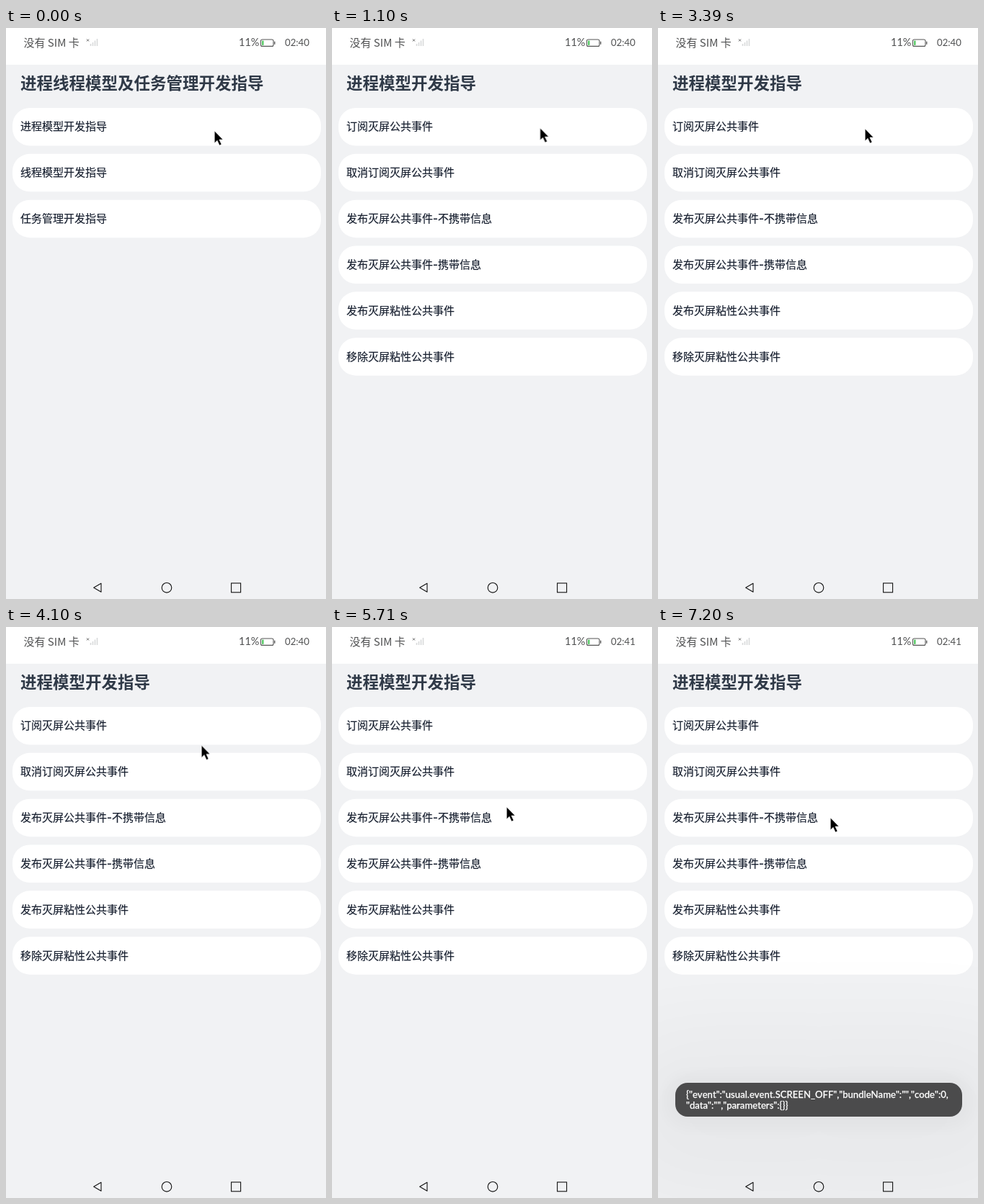
An HTML page that plays this animation: 444 px wide and 793 px high, repeating every 8 s.

```html
<!DOCTYPE html>
<html lang="zh-CN">
<head>
<meta charset="utf-8">
<title>开发指导</title>
<style>
html, body { margin: 0; width: 100%; height: 100%; overflow: hidden; background: #f1f2f4; }
svg, .toast { position: absolute; }
svg { left: 0; top: 0; width: 444px; height: 793px; }
text { font-family: "Noto Sans CJK SC", "Noto Sans CJK", sans-serif; white-space: pre; }
.title { font-size: 22.5px; font-weight: 700; fill: #2f3947; }
.item { font-size: 15px; font-weight: 500; fill: #182030; stroke: #182030; stroke-width: .2px; }
.item tspan { font-family: Inter, sans-serif; }
.status { font-size: 15px; fill: #505152; }
.latin { font-family: Lato, "Noto Sans", sans-serif; font-kerning: none; }
.msg { font-size: 13.1px; font-weight: 500; fill: #fff; stroke: #fff; stroke-width: .25px; }
.toast { box-sizing: border-box; border-radius: 17px; background: #4b4b4c; }
.toast.narrow { box-shadow: 0 6px 36px 18px rgba(0,0,0,.025), 0 8px 130px 70px rgba(0,0,0,.045); }
.toast.wide { box-shadow: 0 2px 24px 16px rgba(0,0,0,.03), 0 20px 140px 100px rgba(0,0,0,.04); }

.home, .guide, .narrow, .wide, .before, .after, .cursor { animation: 8s step-end infinite; }
.home { animation-name: home; }
.guide { animation-name: guide; }
.narrow { animation-name: narrow; }
.wide { animation-name: wide; }
.before { animation-name: before; }
.after { animation-name: after; }
.cursor { animation-name: move; }
@keyframes home { 0% { opacity: 1 } 13.75%, 100% { opacity: 0 } }
@keyframes guide { 0% { opacity: 0 } 13.75%, 100% { opacity: 1 } }
@keyframes narrow { 0% { opacity: 0 } 29.75% { opacity: 1 } 42.375%, 100% { opacity: 0 } }
@keyframes wide { 0% { opacity: 0 } 90%, 100% { opacity: 1 } }
@keyframes before { 0% { opacity: 1 } 71.375%, 100% { opacity: 0 } }
@keyframes after { 0% { opacity: 0 } 71.375%, 100% { opacity: 1 } }
@keyframes move {
  0% { transform: translate(289px, 143px) }
  6.25% { transform: translate(288.5px, 139px) }
  42.375% { transform: translate(287px, 140px) }
  51.25% { transform: translate(271px, 164.5px) }
  54.75% { transform: translate(262px, 183.5px) }
  60.5% { transform: translate(253.5px, 213px) }
  65.625% { transform: translate(247px, 235px) }
  71.375% { transform: translate(242px, 250px) }
  76.75%, 100% { transform: translate(239px, 265px) }
}
</style>
</head>
<body>
<svg viewBox="0 0 444 793">
  <defs><rect id="card" x="9" width="428" height="52.5" rx="24" fill="#fff"/></defs>
  <rect width="444" height="51" fill="#fff"/>

  <text class="status" x="24.5" y="25.5">没有 SIM 卡</text>
  <path d="M112 15.5l3 3m0-3l-3 3" stroke="#555" stroke-width=".9"/>
  <path d="M117.5 25v-3m3 3v-5m3 5v-7.5m3 7.5v-10" stroke="#d8d9da" stroke-width="1.6"/>
  <g class="status">
    <text class="latin" x="323" y="25.3" font-size="14.5">11%</text>
    <text class="latin before" x="387" y="25" font-size="13.2">02:40</text>
    <text class="latin after" x="387" y="25" font-size="13.2">02:41</text>
  </g>
  <rect x="353.5" y="16" width="17.5" height="9.4" rx="2" fill="#fff" stroke="#555" stroke-width="1.1"/>
  <rect x="355" y="17.4" width="2.6" height="6.6" rx=".8" fill="#5cc96a"/>
  <path d="M372.8 18.7v4" stroke="#555" stroke-width="1.3"/>

  <g class="home">
    <text class="title" x="20" y="85.3">进程线程模型及任务管理开发指导</text>
    <use href="#card" y="111"/><text class="item" x="20" y="142.3">进程模型开发指导</text>
    <use href="#card" y="174.8"/><text class="item" x="20" y="206.2">线程模型开发指导</text>
    <use href="#card" y="238.7"/><text class="item" x="20" y="270.1">任务管理开发指导</text>
  </g>

  <g class="guide">
    <text class="title" x="20" y="85.3">进程模型开发指导</text>
    <use href="#card" y="111"/><text class="item" x="20" y="142.3">订阅灭屏公共事件</text>
    <use href="#card" y="174.8"/><text class="item" x="20" y="206.2">取消订阅灭屏公共事件</text>
    <use href="#card" y="238.7"/><text class="item" x="20" y="270.1">发布灭屏公共事件<tspan>-</tspan>不携带信息</text>
    <use href="#card" y="302.5"/><text class="item" x="20" y="333.9">发布灭屏公共事件<tspan>-</tspan>携带信息</text>
    <use href="#card" y="366.3"/><text class="item" x="20" y="397.8">发布灭屏粘性公共事件</text>
    <use href="#card" y="430.2"/><text class="item" x="20" y="461.6">移除灭屏粘性公共事件</text>
  </g>
</svg>

<div class="toast narrow" style="left:142px;top:645.5px;width:162px;height:34.5px"></div>
<div class="toast wide" style="left:24px;top:632.5px;width:398px;height:47.5px"></div>

<svg viewBox="0 0 444 793">
  <text class="msg narrow" x="157" y="667.3">成功订阅灭屏公共事件</text>
  <g class="wide">
    <text class="msg latin" x="39" y="653.5">{"event":"usual.event.SCREEN_OFF","bundleName":"","code":0,</text>
    <text class="msg latin" x="39" y="668.8">"data":"","parameters":{}}</text>
  </g>
  <g fill="none" stroke="#111" stroke-width="1.1">
    <path d="M121.7 777.3L132 771.3v12z" stroke-linejoin="round"/>
    <circle cx="223" cy="777.3" r="6.8"/>
    <rect x="312.6" y="771" width="13" height="12.8"/>
  </g>
  <g class="cursor">
    <path d="M.3 0V16.8L4.1 13.2 7.2 19.9 10 18.6 6.9 12H12z" stroke="#fff" stroke-width=".5"/>
  </g>
</svg>
</body>
</html>
```
